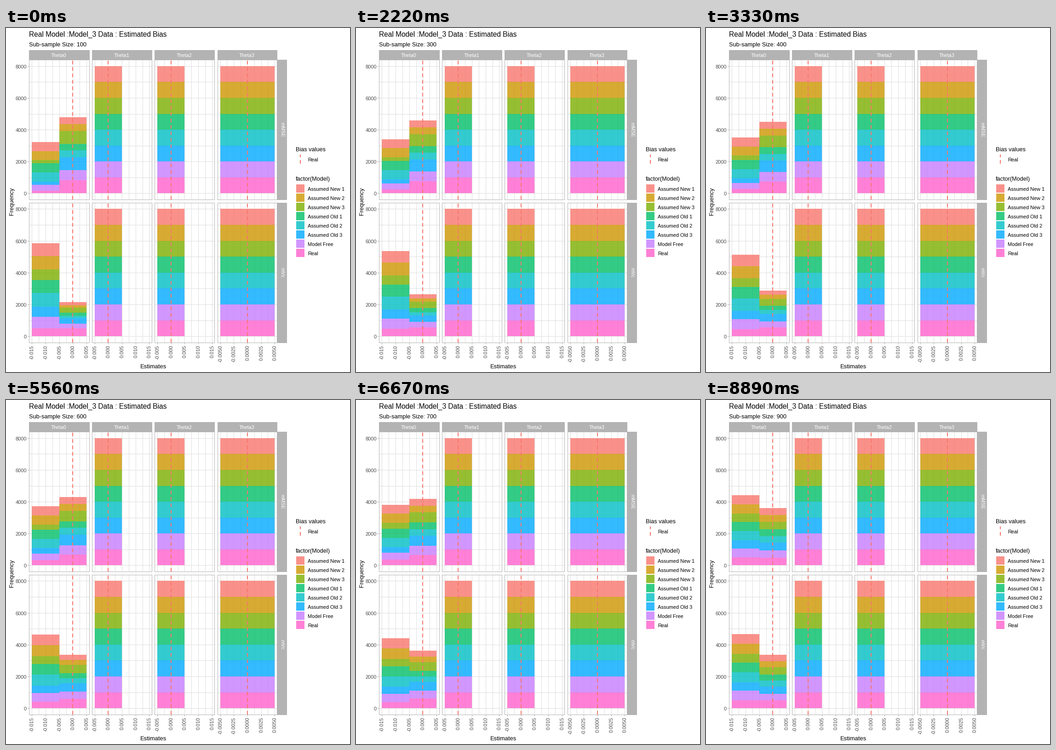
Recreate the animation shown at these times as a matplotlib script. Size 748 by 748 pixels, loop 10 s.

```python
import numpy as np
import matplotlib.pyplot as plt
from matplotlib.animation import FuncAnimation
from matplotlib.collections import LineCollection
from matplotlib.patches import Rectangle

SIZE, DPI = 748, 64
PT = 72 / DPI  # points per pixel
LOOP, FRAMES, STEPS = 10000, 200, 9
plt.rcParams["font.family"] = "Liberation Sans"

MODELS = ["Real", "Model Free", "Assumed Old 3", "Assumed Old 2",
          "Assumed Old 1", "Assumed New 3", "Assumed New 2", "Assumed New 1"]
COLORS = ["#FF61CC", "#C77CFF", "#00A9FF", "#00BFC4",
          "#00BE67", "#7CAE00", "#CD9600", "#F8766D"]
GRID, EDGE, AXIS_TEXT, RED = "#DEDEDE", "#B3B3B3", "#4D4D4D", "#F8766D"

PANELS = [(50, 181), (187, 317), (323, 453), (460, 589)]
ROWS = [(69, 373, 359.47, "mMSE"), (380, 684, 670.13, "mVc")]
TICK_STEP, UNIT = 29.65, 0.03458
ZERO_TICK = [3, 1, 1, 2]

# Of 1000 runs per model, how many fall in the lower Theta0 bin (per row):
# a straight trend from START, with a late jump that lands on END.
START = np.array([[170, 375, 190, 575, 575, 200, 560, 565],
                  [498, 715, 655, 850, 812, 662, 858, 805]])
END = np.array([[515, 545, 510, 595, 575, 525, 575, 570],
                [500, 605, 520, 632, 622, 535, 625, 615]])
UNBIASED = np.array([m.endswith("3") or "Assumed" not in m for m in MODELS])
JUMP = np.array([np.where(UNBIASED, 100, 0), np.where(UNBIASED, 150, 40)])

fig = plt.figure(figsize=(SIZE / DPI, SIZE / DPI), dpi=DPI, facecolor="white")
ax = fig.add_axes([0, 0, 1, 1])
ax.set_xlim(0, SIZE)
ax.set_ylim(SIZE, 0)
ax.axis("off")


def rect(x, y, w, h, color, z=2, alpha=None):
    r = Rectangle((x, y), w, h, facecolor=color, edgecolor="none", linewidth=0,
                  alpha=alpha, antialiased=False, zorder=z)
    return ax.add_patch(r)


def lines(segments, color, z):
    ax.add_collection(LineCollection(
        segments, colors=color, linewidths=PT, antialiaseds=False,
        zorder=z, snap=False, capstyle="butt"))


def dashed(x, bottom, top):
    width = 2
    ax.plot([x, x], [bottom, top], color=RED, lw=width * PT, zorder=4,
            linestyle=(0, (7 / width, 6 / width)), snap=False, antialiased=False)


def text(x, y, s, px, color="black", ha="left", va="baseline", rot=0):
    return ax.text(x, y, s, fontsize=px * PT, color=color, ha=ha, va=va,
                   rotation=rot, zorder=6)


def pixel(v):
    return np.round(v) + 0.5


def tick_x(col, k):
    return 56.4 + 136.4 * col + TICK_STEP * k


def make_stack(col, k0, k1):
    x0, x1 = round(tick_x(col, k0)), round(tick_x(col, k1))
    return [rect(x0, 0, x1 - x0, 0, c, alpha=0.8) for c in COLORS]


def set_stack(stack, base, counts):
    tops = np.concatenate([[0], np.cumsum(counts)])
    edges = np.round(base - tops * UNIT)
    for bar, lo, hi in zip(stack, edges[:-1], edges[1:]):
        bar.set_y(hi)
        bar.set_height(lo - hi)


grid, edges = [], []


def draw_panel(col, top, bottom, base):
    left, right = PANELS[col]
    for k in np.arange(0, 4.5, 0.5):
        x = pixel(tick_x(col, k))
        grid.append([(x, top), (x, bottom)])
    for v in range(0, 9000, 1000):
        y = pixel(base - v * UNIT)
        grid.append([(left, y), (right, y)])
    for x in (left + 0.5, right + 0.5):
        edges.append([(x, top), (x, bottom + 1)])
    for y in (top + 0.5, bottom + 0.5):
        edges.append([(left, y), (right + 1, y)])
    dashed(round(tick_x(col, ZERO_TICK[col])), bottom, top)


low, high = [], []
for top, bottom, base, name in ROWS:
    for col in range(4):
        draw_panel(col, top, bottom, base)
    low.append(make_stack(0, 0, 2))
    high.append(make_stack(0, 2, 4))
    for col, last in ((1, 2), (2, 2), (3, 4)):
        set_stack(make_stack(col, 0, last), base, [1000] * len(MODELS))

    rect(590, top, 21, bottom - top + 1, EDGE, 5)
    text(600, (top + bottom) / 2, name, 10.8, "white", "center", "center", -90)
    for v in range(0, 10000, 2000):
        y = pixel(base - v * UNIT)
        edges.append([(47, y), (50, y)])
        text(45, y + 4.5, str(v), 11, AXIS_TEXT, "right")

for col, (left, right) in enumerate(PANELS):
    rect(left, 48, right - left + 1, 21, EDGE, 5)
    text((left + right) / 2 - 0.5, 63.3, f"Theta{col}", 10.8, "white", "center")
    step, digits = (0.0025, 4) if col == 3 else (0.005, 3)
    for k in range(5):
        x = pixel(tick_x(col, k))
        edges.append([(x, 685), (x, 688)])
        value = (k - ZERO_TICK[col]) * step
        text(x, 689.5, f"{value:.{digits}f}", 11, AXIS_TEXT, "center", "top", 90)

lines(grid, GRID, 1)
lines(edges, EDGE, 5)

text(50, 19, "Real Model :Model_3 Data : Estimated Bias", 15.5)
subtitle = text(50, 39.7, "", 12.8)
text(320.5, 740, "Estimates", 13, ha="center")
text(13, 376.5, "Frequency", 12.7, ha="center", va="center", rot=90)

text(630, 268, "Bias values", 12.8)
dashed(640, 295, 275)
text(656, 289.5, "Real", 11)
text(630, 332, "factor(Model)", 12.7)
for i, (name, color) in enumerate(zip(MODELS[::-1], COLORS[::-1])):
    rect(631, 340 + 20 * i, 18, 18, color, alpha=0.8)
    text(656, 353.6 + 20 * i, name, 11)


def low_counts(t):
    return START + (END - JUMP - START) * t + JUMP * t ** 16


def update(i):
    step = (STEPS * i + STEPS - 1) // FRAMES
    subtitle.set_text(f"Sub-sample Size: {100 * (step + 1)}")
    counts = low_counts(step / (STEPS - 1))
    for row, (_, _, base, _) in enumerate(ROWS):
        set_stack(low[row], base, counts[row])
        set_stack(high[row], base, 1000 - counts[row])
    return []


anim = FuncAnimation(fig, update, frames=FRAMES, interval=LOOP // FRAMES,
                     repeat=True, repeat_delay=0, blit=False)
plt.show()
```
